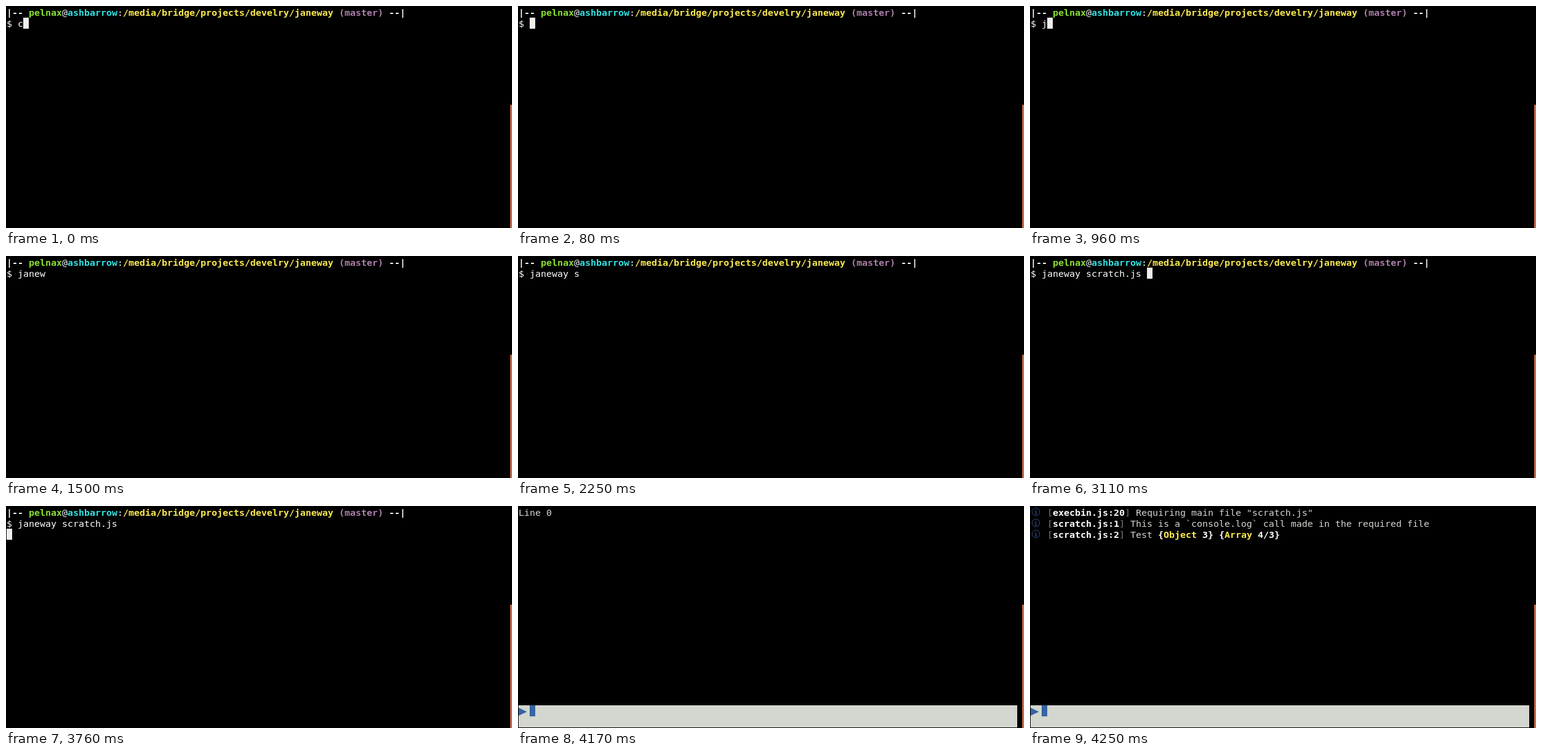
These frames come from a looping animation (822x362 px, 8 s). An HTML page:

```html
<!DOCTYPE html>
<html lang="en">
<head>
<meta charset="utf-8">
<title>Terminal session</title>
<style>
  html, body { margin: 0; width: 100%; height: 100%; overflow: hidden; background: #000; }
  svg { display: block; }
  text { font: 14.95px "DejaVu Sans Mono", monospace; white-space: pre; }
  .bold { font-weight: bold; }
</style>
</head>
<body>
<svg id="stage" width="822" height="362" viewBox="0 0 822 362">
  <rect width="822" height="362"/>
  <g id="screen"></g>
  <rect x="819" y="161" width="3" height="201" fill="#c9693f"/>
</svg>
<script>
const LOOP = 8000, CELL_W = 9, CELL_H = 18;
const WHITE = '#ffffff', GRAY = '#d3d7cf', DIM = '#555753', YELLOW = '#fce94f', BLUE = '#3465a4';
const screen = document.getElementById('screen');

const left = col => 1 + col * CELL_W;
const top_ = row => 1 + row * CELL_H;
const escape = s => s.replace(/&/g, '&amp;').replace(/</g, '&lt;');

// A line is a list of [text, color, bold] runs on the character grid.
function line(row, col, runs) {
  return runs.map(([text, color, bold]) => {
    const x = left(col);
    col += text.length;
    return `<text x="${x}" y="${top_(row) + 15}" fill="${color}"${bold ? ' class="bold"' : ''}>${escape(text)}</text>`;
  }).join('');
}

const block = (row, col, color = '#eeeeec') =>
  `<rect x="${left(col)}" y="${top_(row)}" width="${CELL_W}" height="${CELL_H}" fill="${color}"/>`;

const prompt = line(0, 0, [
  ['|-- ', WHITE, true],
  ['pelnax', '#8ae234', true],
  ['@', WHITE],
  ['ashbarrow', '#34e2e2', true],
  [':', WHITE],
  ['/media/bridge/projects/develry/janeway', YELLOW, true],
  [' (master)', '#ad7fa8', true],
  [' --|', WHITE, true]
]);

function shell(typed, cursor = true, cursorRow = 1) {
  const col = cursorRow === 1 ? 2 + typed.length : 0;
  return prompt + line(1, 0, [['$ ' + typed, WHITE]]) + (cursor ? block(cursorRow, col) : '');
}

const inputBar =
  `<rect x="1" y="325" width="810" height="36" fill="${GRAY}"/>` +
  `<path d="M1 329L14.5 335.5L1 342Z" fill="${BLUE}"/>` + block(18, 2, BLUE);

function logLine(row, place, runs) {
  const y = top_(row) + 8.5;
  const icon = `<g fill="none" stroke="#35529a"><circle cx="9.5" cy="${y}" r="6.2" stroke-width=".9"/>` +
    `<path d="M9.5 ${y - 3.8}v1.4M8 ${y - 1}h1.5v4.5M7.8 ${y + 3.5}h3.6"/></g>`;
  return icon + line(row, 3, [['[', DIM, true], [place, WHITE, true], [']', DIM, true], [' ', GRAY], ...runs]);
}

const log =
  logLine(0, 'execbin.js:20', [['Requiring main file "scratch.js"', GRAY]]) +
  logLine(1, 'scratch.js:1', [['This is a `console.log` call made in the required file', GRAY]]) +
  logLine(2, 'scratch.js:2', [
    ['Test ', GRAY],
    ['{', WHITE, true], ['Object', YELLOW, true], [' 3} {', WHITE, true],
    ['Array', YELLOW, true], [' 4/3}', WHITE, true]
  ]);

const steps = [
  [0, shell('c')],
  [80, shell('')],
  [960, shell('j')],
  [1060, shell('ja', false)],
  [1200, shell('jan', false)],
  [1280, shell('jane', false)],
  [1500, shell('janew', false)],
  [1710, shell('janewa', false)],
  [1830, shell('janeway', false)],
  [2250, shell('janeway s', false)],
  [2450, shell('janeway sc')],
  [2760, shell('janeway scr')],
  [3110, shell('janeway scratch.js ')],
  [3760, shell('janeway scratch.js', true, 2)],
  [4170, line(0, 0, [['Line 0', GRAY]]) + inputBar],
  [4250, log + inputBar]
];

let shown;
function render(time) {
  const step = steps.findLast(([start]) => start <= time);
  if (step !== shown) screen.innerHTML = step[1];
  shown = step;
}

const begin = performance.now();
function tick() {
  render((performance.now() - begin) % LOOP);
  requestAnimationFrame(tick);
}
tick();
</script>
</body>
</html>
```
